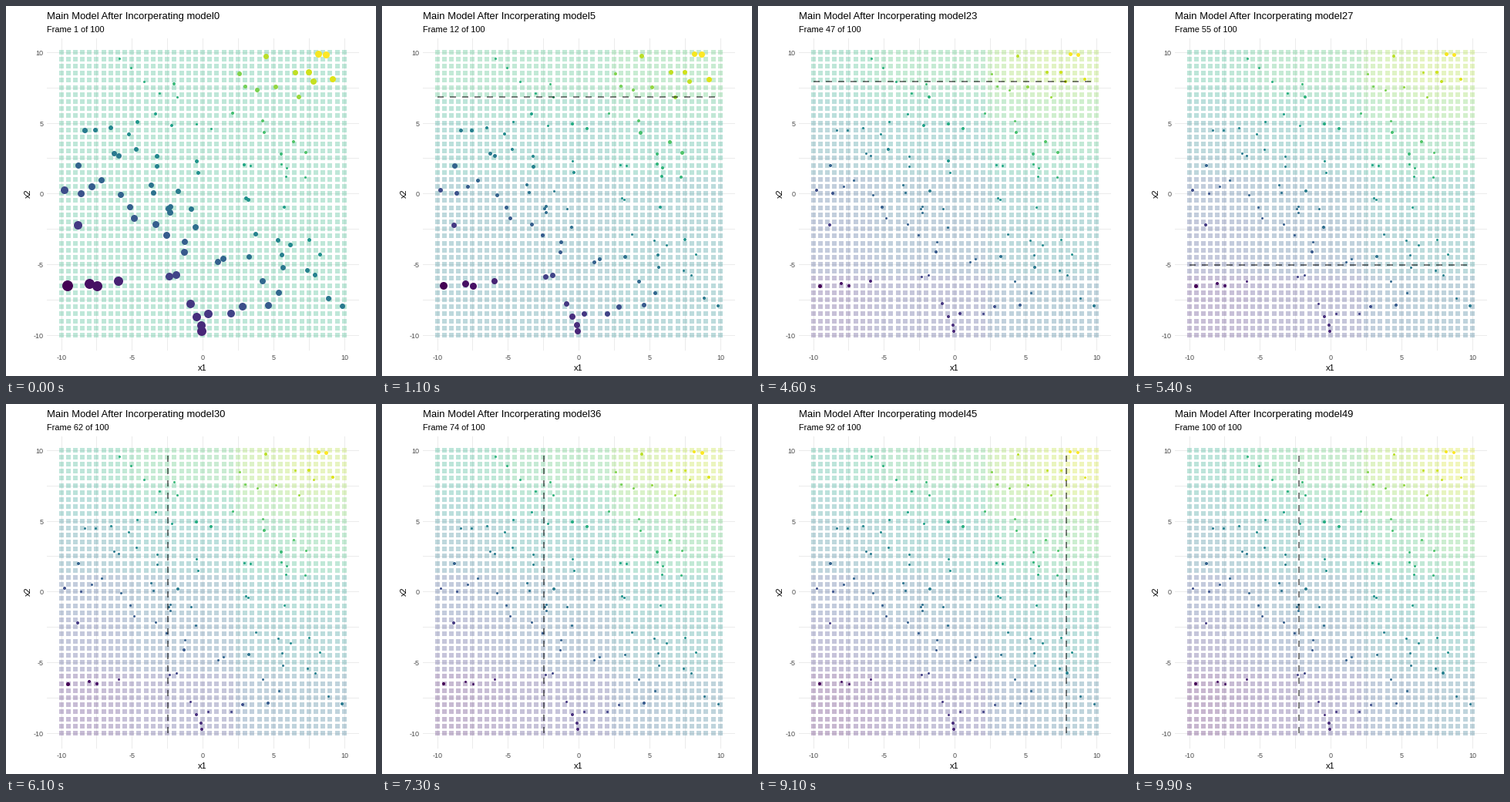
These frames come from a looping animation (480 px wide and 480 px high, 10000 ms). A matplotlib script:

```python
import numpy as np
import matplotlib.pyplot as plt
from matplotlib.animation import FuncAnimation
from matplotlib.collections import EllipseCollection

SIZE, FRAMES, MODELS = 480, 100, 50
RATE, MIN_LEAF = 0.2, 7
UNIT, CX, CY = 18.36, 255.6, 243.8

plt.rcParams["font.family"] = "Liberation Sans"


def uniform(seed, n):
    """Mersenne Twister started from a linear congruential sequence."""
    keys = []
    for i in range(675):
        seed = (69069 * seed + 1) % 2**32
        if i > 50:
            keys.append(seed)
    rng = np.random.RandomState()
    rng.set_state(("MT19937", np.array(keys, dtype=np.uint32), 624))
    return rng.randint(0, 2**32, n, dtype=np.uint32) / 2**32


def best_stump(x, res):
    """Split (axis, cut, left mean, right mean) with the least squared error."""
    best, n = (-1.0,), len(res)
    for axis in (0, 1):
        order = np.argsort(x[axis])
        xs, rs = x[axis][order], res[order]
        for k in range(MIN_LEAF, n - MIN_LEAF + 1):
            a, b = rs[:k].mean(), rs[k:].mean()
            gain = k * (n - k) * (a - b) ** 2
            if gain > best[0]:
                best = (gain, axis, (xs[k - 1] + xs[k]) / 2, a, b)
    return best[1:]


def boost(x, y, grid):
    """Residuals, grid predictions and split after each model."""
    start = np.quantile(y, 0.75)
    fit, surface = np.full(len(y), start), np.full(grid.shape[1], start)
    steps = [(y - fit, surface, None)]
    for _ in range(MODELS - 1):
        axis, cut, a, b = best_stump(x, y - fit)
        fit = fit + RATE * np.where(x[axis] < cut, a, b)
        surface = surface + RATE * np.where(grid[axis] < cut, a, b)
        steps.append((y - fit, surface, (axis, cut)))
    return steps


def px(v):
    return np.floor(CX + UNIT * np.asarray(v))


def py(v):
    return np.floor(CY - UNIT * np.asarray(v))


x = (uniform(1, 200) * 20 - 10).reshape(2, 100)
y = 2 * x[0] + 3 * x[1]
ticks = np.arange(-10, 10.1, 0.5)
grid = np.array([g.ravel() for g in np.meshgrid(ticks, ticks)])
steps = boost(x, y, grid)
top = max(np.abs(s[0]).max() for s in steps)
centers = np.column_stack([px(x[0]), py(x[1])])


def diameters(res):
    """Whole-pixel dot widths growing linearly with the error."""
    size = 1 + 5 * np.abs(res) / top
    return np.floor(0.75 * (2.845 * size + 0.945) + 0.5)


fig = plt.figure(figsize=(SIZE / 72, SIZE / 72), dpi=72, facecolor="white")
ax = fig.add_axes([0, 0, 1, 1])
ax.set_xlim(0, SIZE)
ax.set_ylim(SIZE, 0)
ax.axis("off")

for v in np.arange(-10, 10.1, 2.5):
    style = dict(color="#ebebeb", lw=1, snap=False, zorder=0,
                 solid_capstyle="butt")
    ax.plot([px(v) + 0.5] * 2, [42, 447], **style)
    ax.plot([53, 458], [py(v) + 0.5] * 2, **style)
for v in range(-10, 11, 5):
    style = dict(size=9, color="#4d4d4d", va="baseline")
    ax.text(px(v) + 0.5, 459, str(v), ha="center", **style)
    ax.text(48.5, py(v) + 4, str(v), ha="right", **style)
ax.text(255, 473, "x1", size=11, ha="center", va="baseline")
ax.text(33.5, 243.5, "x2", size=11, ha="right", va="center", rotation=90)
title = ax.text(53, 17, "", size=13, va="baseline")
subtitle = ax.text(53, 34, "", size=11, va="baseline")

cells = ax.scatter(px(grid[0]), py(grid[1]), s=36, marker="s", c=steps[0][1],
                   cmap="viridis", vmin=y.min(), vmax=y.max(), alpha=0.3,
                   linewidths=0, snap=False, zorder=1)
dots = EllipseCollection(np.ones(100), np.ones(100), np.zeros(100), units="xy",
                         offsets=centers, offset_transform=ax.transData,
                         cmap="viridis", linewidths=0, zorder=2)
dots.set_array(y)
dots.set_clim(y.min(), y.max())
ax.add_collection(dots)
split, = ax.plot([], [], color="black", alpha=0.5, lw=2, dashes=(4, 4),
                 dash_capstyle="butt", snap=False, zorder=3)


def draw(i):
    model = round(i * (MODELS - 1) / (FRAMES - 1))
    res, surface, cut = steps[model]
    title.set_text(f"Main Model After Incorperating model{model}")
    subtitle.set_text(f"Frame {i + 1} of {FRAMES}")
    cells.set_array(surface)
    d = diameters(res)
    dots.set(widths=d, heights=d, offsets=centers + (d % 2)[:, None] / 2)
    span = np.array([-10, 10])
    if cut is None:
        split.set_data([], [])
    elif cut[0] == 0:
        split.set_data([px(cut[1])] * 2, py(span))
    else:
        split.set_data(px(span), [py(cut[1])] * 2)
    return cells, dots, split, title, subtitle


anim = FuncAnimation(fig, draw, frames=FRAMES, interval=100, repeat=True,
                     repeat_delay=0, blit=False)
plt.show()
```
